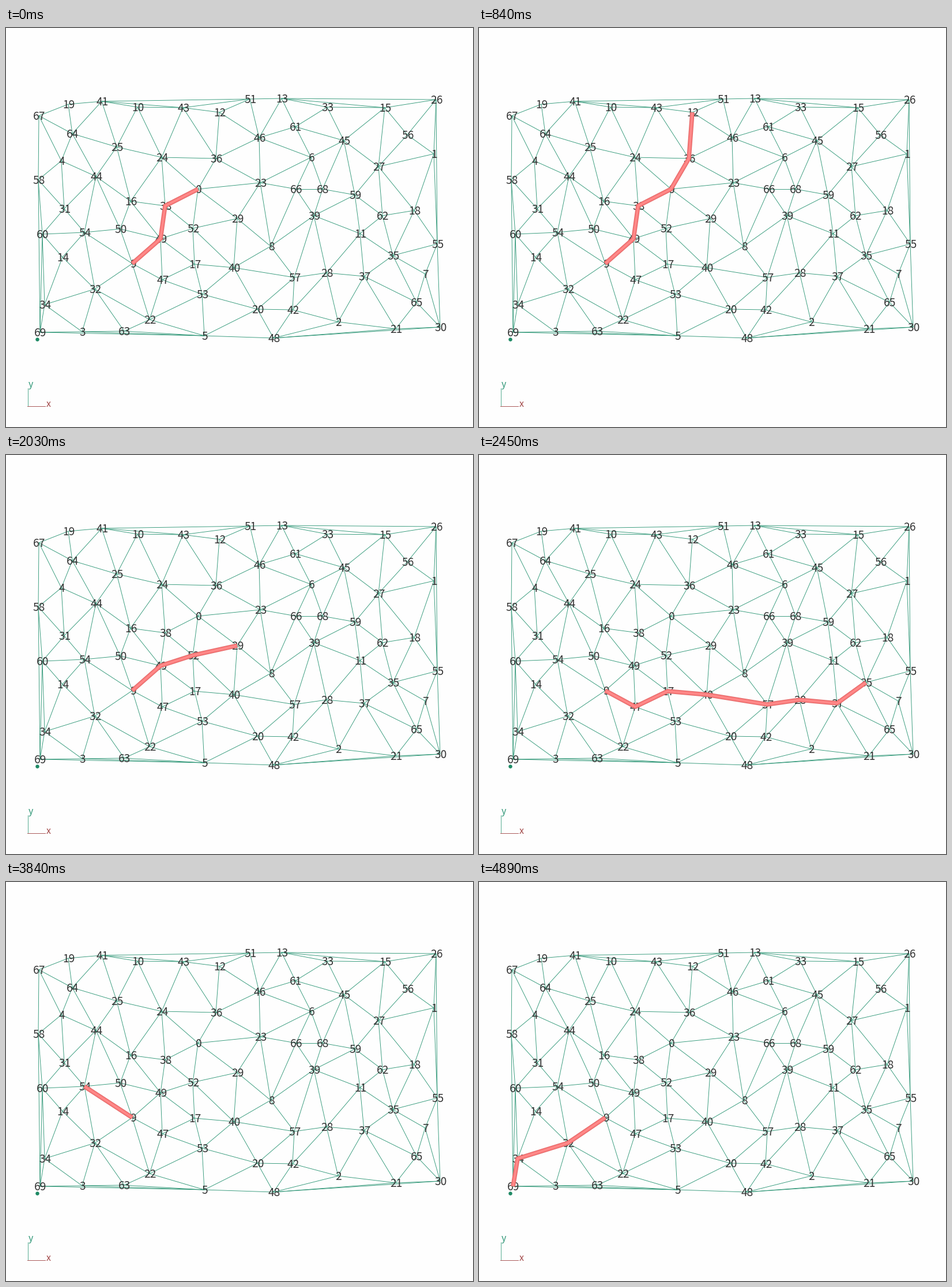
A matplotlib script that plays this animation: 810 by 691 pixels, repeating every 4960 ms.

```python
import numpy as np
import matplotlib.pyplot as plt
from matplotlib.animation import FuncAnimation
from matplotlib.collections import LineCollection
from matplotlib.tri import Triangulation

W, H, DPI = 810, 691, 100
PX = 72 / DPI  # points per pixel
STEP, LOOP = 20, 4960
START = 9
GREEN, RED = "#2f9777", "#a34a4a"
FONT = "Noto Sans CJK JP"

# label centres, in order of node number
LABELS = np.array([
    334, 279, 743, 218, 577, 509, 133, 526, 97, 230, 345, 533, 530, 224,
    728, 426, 460, 378, 220, 408, 229, 137, 615, 356, 371, 146, 479, 122,
    99, 397, 658, 138, 217, 300, 328, 409, 709, 316, 109, 132, 437, 487,
    677, 521, 250, 505, 442, 268, 271, 224, 193, 206, 747, 124, 647, 240,
    557, 424, 402, 330, 754, 518, 102, 313, 155, 452, 558, 137, 68, 479,
    672, 394, 365, 226, 622, 430, 277, 308, 535, 325, 396, 415, 167, 127,
    498, 488, 308, 138, 157, 257, 587, 195, 440, 190, 272, 436, 465, 537,
    269, 365, 199, 348, 424, 123, 325, 347, 341, 461, 137, 354, 749, 374,
    697, 185, 501, 432, 57, 263, 606, 289, 64, 357, 503, 171, 654, 325,
    206, 525, 116, 183, 713, 475, 504, 279, 58, 152, 550, 279, 60, 527,
], float).reshape(-1, 2)
NODES = LABELS - (1, 0)


def mesh_edges(pts, longest=300):
    """Delaunay edges without the flattest slivers along the hull."""
    edges = Triangulation(pts[:, 0], pts[:, 1]).edges
    lengths = np.hypot(*(pts[edges[:, 0]] - pts[edges[:, 1]]).T)
    keep = lengths < longest
    return edges[keep], lengths[keep]


def shortest_paths(edges, lengths, start, count):
    """Node list from start to every node."""
    dist = np.full(count, np.inf)
    dist[start] = 0
    parent = [None] * count
    changed = True
    while changed:
        changed = False
        for (a, b), d in zip(edges, lengths):
            for u, v in ((a, b), (b, a)):
                if dist[u] + d < dist[v] - 1e-9:
                    dist[v], parent[v] = dist[u] + d, u
                    changed = True
    paths = []
    for node in range(count):
        path = [node]
        while parent[path[-1]] is not None:
            path.append(parent[path[-1]])
        paths.append(path[::-1])
    return paths


def goal_at(t):
    """One node every 70 ms, with a single longer hold halfway."""
    return int(t // 70 if t < 2590 else (t - 60) // 70)


edges, lengths = mesh_edges(NODES)
paths = shortest_paths(edges, lengths, START, len(NODES))

fig = plt.figure(figsize=(W / DPI, H / DPI), dpi=DPI, facecolor="#fefefe")
ax = fig.add_axes([0, 0, 1, 1])
ax.set_xlim(0, W)
ax.set_ylim(H, 0)
ax.axis("off")

ax.add_collection(LineCollection(NODES[edges], colors=GREEN,
                                 linewidths=0.9 * PX, zorder=1))
for i, (x, y) in enumerate(LABELS):
    ax.text(x, y + 7, str(i), family=FONT, size=19.2 * PX, color="#333333",
            ha="center", va="baseline", zorder=2)

# origin marker and axis icon
ax.plot(54, 539, "o", ms=6.5 * PX, mew=0, color="#1f8a65")
ax.plot([37.5, 37.5], [624, 654], color=GREEN, lw=0.8 * PX)
ax.plot([37, 68], [654.5, 654.5], color=RED, lw=0.9 * PX)
for x, y, name, color in ((43, 622.5, "y", GREEN), (74, 655.5, "x", RED)):
    ax.text(x, y, name, family=FONT, size=16 * PX, color=color,
            ha="center", va="baseline")

# the route is a shaded tube: dark rim, body, soft highlight
tube = [
    ax.plot([], [], color=color, lw=width * PX, zorder=3 + k,
            solid_capstyle="butt", solid_joinstyle="round")[0]
    for k, (color, width) in enumerate(
        (("#e26666", 7.6), ("#f97b7b", 5.6), ("#ff8a8a", 2.6)))
]


def draw(i):
    path = paths[goal_at(i * STEP + STEP / 2)]
    pts = NODES[path] if len(path) > 1 else np.empty((0, 2))
    for line in tube:
        line.set_data(pts[:, 0], pts[:, 1])
    return tube


anim = FuncAnimation(fig, draw, frames=LOOP // STEP, interval=STEP,
                     repeat=True, repeat_delay=0, blit=True)
plt.show()
```
